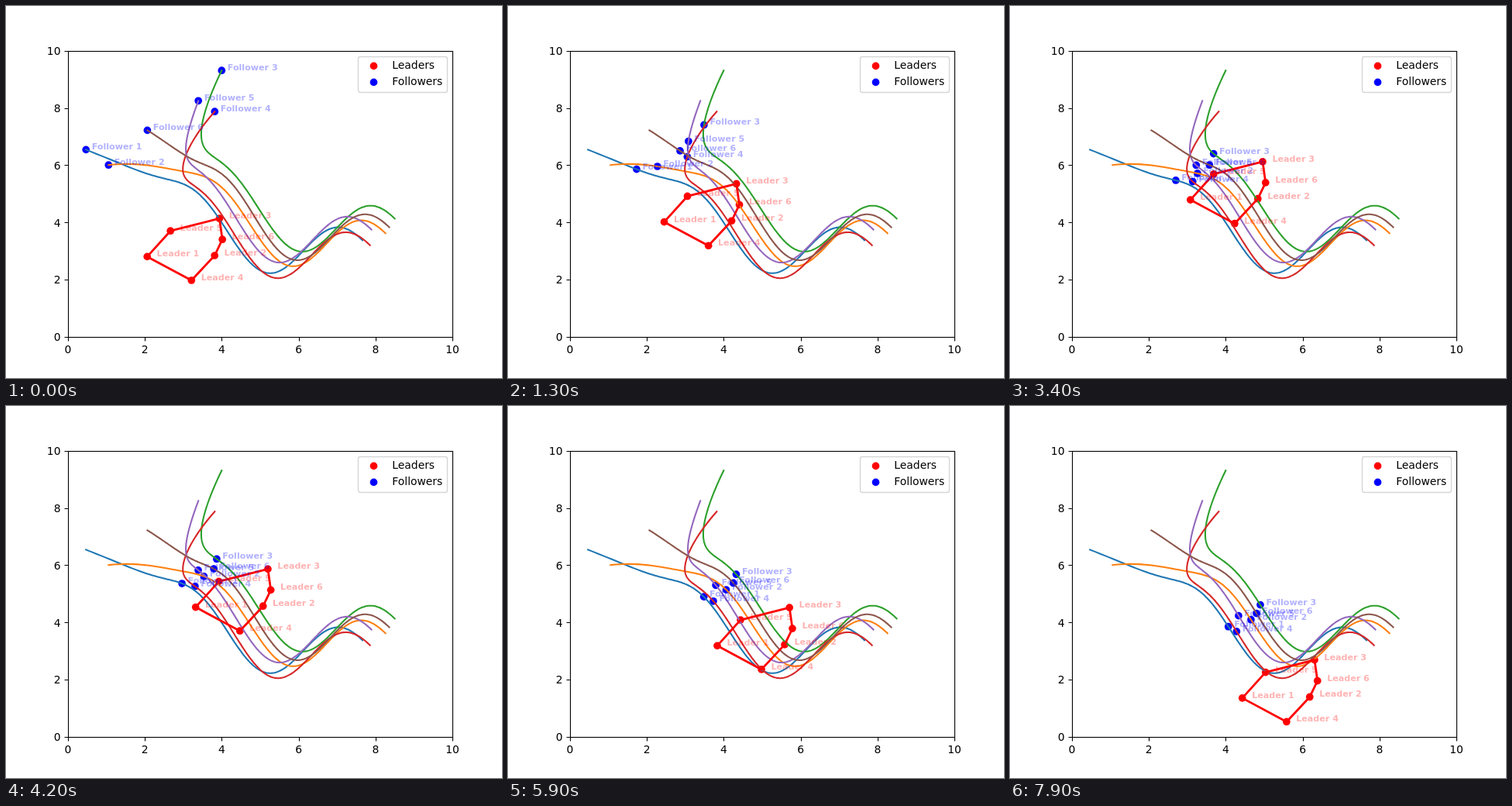
Recreate the animation shown at these times as an HTML page. Size 640 by 480 pixels, loop 8000 ms.

```html
<!DOCTYPE html>
<html lang="en">
<head>
<meta charset="utf-8">
<title>Leaders and followers</title>
<style>
  html, body { margin: 0; width: 100%; height: 100%; overflow: hidden; background: #fff; }
  svg { display: block; width: 640px; height: 480px; }
  text { font: 13.89px "DejaVu Sans", sans-serif; }
  .tag { font-size: 11.11px; font-weight: bold; opacity: .3; }
  .axis { fill: none; stroke: #000; stroke-width: 1.1; }
  .trail { fill: none; stroke-width: 2.08; stroke-linecap: square; stroke-linejoin: round; }
  .hull { fill: none; stroke: red; stroke-width: 2.78; stroke-linejoin: round; }
</style>
</head>
<body>
<svg id="stage" viewBox="0 0 640 480"></svg>
<script>
const STEP_MS = 100, LOOP_STEPS = 80, TRAIL_STEPS = 200;
const UNIT_X = 49.6, UNIT_Y = 36.96;
const GAIN = 0.025;
const DOT_R = 4.86;

const leaders = [[182.2, 323.4], [269.2, 322], [275.4, 274.2], [239.3, 354], [212.2, 290.2], [279.2, 301.2]];
const starts = [[103.2, 185.4], [132.3, 205.2], [278.3, 83.2], [269.3, 136.2], [248.2, 122.3], [182.4, 160.4]];
const hullOrder = [0, 3, 1, 5, 2, 4];
const chain = [2, 1, 0, 3, 4, 5];  // followers linked to their neighbours in this order
const colors = ["#1f77b4", "#ff7f0e", "#2ca02c", "#d62728", "#9467bd", "#8c564b"];

const stage = document.getElementById("stage");

function add(name, attrs, text) {
  const el = document.createElementNS("http://www.w3.org/2000/svg", name);
  for (const key in attrs) el.setAttribute(key, attrs[key]);
  if (text !== undefined) el.textContent = text;
  return stage.appendChild(el);
}

const place = (el, x, y) => el.setAttribute("transform", `translate(${x.toFixed(2)} ${y.toFixed(2)})`);
const pointList = pts => pts.map(p => p.map(v => v.toFixed(2)).join()).join(" ");

function leadersAt(k) {
  const dx = 0.03 * k * UNIT_X, dy = -2 * Math.sin(0.05 * k) * UNIT_Y;
  return leaders.map(([x, y]) => [x + dx, y + dy]);
}

// Each follower is pulled equally by its own leader and its chain neighbours.
function advance(pos, k) {
  const lead = leadersAt(k);
  const next = [];
  chain.forEach((id, i) => {
    const pulls = [lead[id]];
    if (i > 0) pulls.push(pos[chain[i - 1]]);
    if (i < chain.length - 1) pulls.push(pos[chain[i + 1]]);
    next[id] = pos[id].map((v, axis) =>
      v + GAIN * pulls.reduce((sum, p) => sum + p[axis] - v, 0));
  });
  return next;
}

const history = [starts];
for (let k = 0; k < TRAIL_STEPS; k++) history.push(advance(history[k], k));

const dots = (list, fill) => list.map(() => add("circle", { r: DOT_R, fill }));
const tags = (list, word, fill) => list.map((_, i) => add("text", { class: "tag", fill }, `${word} ${i + 1}`));

const leaderDots = dots(leaders, "red");
const followerDots = dots(starts, "blue");

colors.forEach((stroke, i) =>
  add("polyline", { class: "trail", stroke, points: pointList(history.map(p => p[i])) }));
const hull = add("polygon", { class: "hull" });

add("rect", { class: "axis", x: 80.5, y: 58.5, width: 496, height: 369 });
for (let v = 0; v <= 10; v += 2) {
  const x = 80 + v * UNIT_X, y = 427.2 - v * UNIT_Y;
  const tx = Math.round(x) + 0.5, ty = Math.round(y) + 0.5;
  add("path", { class: "axis", d: `M${tx} 427.5v5M80.5 ${ty}h-5` });
  add("text", { x, y: 448, "text-anchor": "middle" }, v);
  add("text", { x: 70.5, y: Math.round(y + 5.2), "text-anchor": "end" }, v);
}

const leaderTags = tags(leaders, "Leader", "red");
const followerTags = tags(starts, "Follower", "blue");

add("rect", { x: 454.5, y: 65.5, width: 115, height: 46, rx: 2.8, fill: "#fff", "fill-opacity": 0.8,
  stroke: "#ccc", "stroke-opacity": 0.8, "stroke-width": 1.39 });
[["Leaders", "red", 81], ["Followers", "blue", 102]].forEach(([label, fill, y]) => {
  add("circle", { cx: 474.5, cy: y - 3.6, r: DOT_R, fill });
  add("text", { x: 498.3, y }, label);
});

function pose(pts, circles, labels, gap) {
  pts.forEach(([x, y], i) => {
    place(circles[i], x, y);
    place(labels[i], x + gap, y);
  });
}

function show(k) {
  const lead = leadersAt(k);
  pose(lead, leaderDots, leaderTags, 0.25 * UNIT_X);
  pose(history[k], followerDots, followerTags, 0.15 * UNIT_X);
  hull.setAttribute("points", pointList(hullOrder.map(i => lead[i])));
}

let origin;
function tick(now) {
  origin ??= now;
  show(Math.floor((now - origin) / STEP_MS) % LOOP_STEPS);
  requestAnimationFrame(tick);
}
show(0);
requestAnimationFrame(tick);
</script>
</body>
</html>
```
